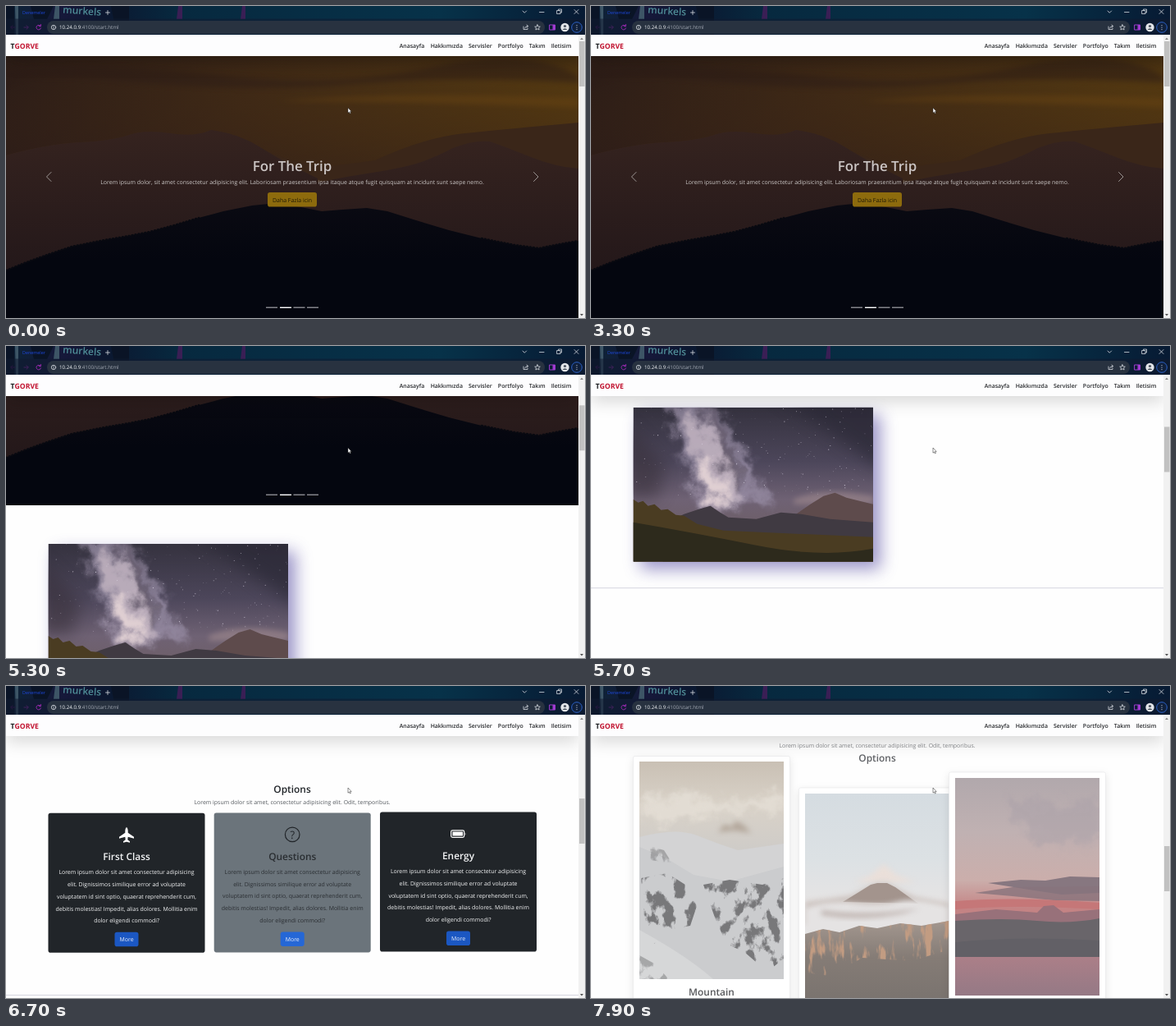
Recreate the animation shown at these times as an HTML page. Size 706x380 px, loop 8000 ms.

```html
<!DOCTYPE html>
<html lang="tr">
<head>
<meta charset="utf-8">
<title>Landing page scroll</title>
<style>
@property --s { syntax: '<number>'; inherits: true; initial-value: 0; }
html, body { margin: 0; width: 100%; height: 100%; overflow: hidden; background: #fff; }
#stage {
  display: block; width: 100vw; height: 100vh;
  font: 6.95px "Open Sans", "Noto Sans", sans-serif;
  text-rendering: geometricPrecision;
  animation: scroll 8s infinite;
}
.mid { text-anchor: middle; }
.h3 { font-size: 11.9px; font-weight: 600; }
#page { transform: translateY(calc(var(--s) * -1px)); }
#thumb { transform: translateY(calc(var(--s) * .1575px)); }
.line { fill: none; stroke-linecap: round; stroke-linejoin: round; }
.rise, .in { animation: rise 8s infinite; }
.in { animation-name: in; }
#bar { filter: drop-shadow(0 7px 10px rgba(0, 0, 0, .15)); }
.photo { filter: drop-shadow(0 3px 5px rgba(0, 0, 0, .1)); }
filter { color-interpolation-filters: sRGB; }

/* page offset, moving in tenths of a second */
@keyframes scroll {
  0% { --s: 0; animation-timing-function: step-end; }
  60% { --s: 20; animation-timing-function: steps(5); }
  66.25% { --s: 186; animation-timing-function: steps(9); }
  77.5% { --s: 560; animation-timing-function: steps(3); }
  81.25% { --s: 597; animation-timing-function: step-end; }
  87.5% { --s: 617; animation-timing-function: steps(8); }
  97.5% { --s: 958; animation-timing-function: step-end; }
  98.75%, 100% { --s: 965; }
}
@keyframes rise {
  0%, 77.5% { opacity: 0; transform: translateY(40px); animation-timing-function: steps(5); }
  83.75%, 100% { opacity: 1; transform: none; }
}
@keyframes in {
  0%, 91.25% { opacity: 0; transform: translate(var(--x, 0px), var(--y, 0px)); animation-timing-function: steps(6); }
  98.75%, 100% { opacity: 1; transform: none; }
}
</style>
</head>
<body>
<svg id="stage" viewBox="0 0 706 380" preserveAspectRatio="none">
  <defs>
    <linearGradient id="sky"><stop stop-color="#281b18"/><stop offset=".4" stop-color="#3c2816"/><stop offset="1" stop-color="#543a10"/></linearGradient>
    <linearGradient id="dusk" x2="0" y2="1"><stop stop-color="#140f12" stop-opacity=".65"/><stop offset=".3" stop-color="#4a2c14" stop-opacity=".15"/><stop offset="1" stop-color="#2a1a1a" stop-opacity=".6"/></linearGradient>
    <linearGradient id="far" x2="0" y2="1"><stop stop-color="#35231f"/><stop offset="1" stop-color="#1e1418"/></linearGradient>
    <linearGradient id="near" x2="0" y2="1"><stop stop-color="#0a0a12"/><stop offset=".5" stop-color="#04060f"/></linearGradient>
    <linearGradient id="night" x2="0" y2="1"><stop stop-color="#35323f"/><stop offset=".35" stop-color="#4c465a"/><stop offset=".6" stop-color="#6f6274"/><stop offset="1" stop-color="#6b5a58"/></linearGradient>
    <linearGradient id="snow" x2="0" y2="1"><stop stop-color="#c9c0b4"/><stop offset=".2" stop-color="#d9d2c8"/><stop offset=".4" stop-color="#cfccc8"/></linearGradient>
    <linearGradient id="pale" x2="0" y2="1"><stop stop-color="#d5dce1"/><stop offset=".3" stop-color="#dce1e4"/><stop offset=".5" stop-color="#e6e4e4"/></linearGradient>
    <linearGradient id="rock" x2="0" y2="1"><stop stop-color="#a3978f"/><stop offset=".4" stop-color="#857c76"/><stop offset="1" stop-color="#77716d"/></linearGradient>
    <linearGradient id="rose" x2="0" y2="1"><stop stop-color="#b1a8ac"/><stop offset=".25" stop-color="#c0b1b2"/><stop offset=".47" stop-color="#cbaeab"/><stop offset=".6" stop-color="#c48384"/></linearGradient>
    <linearGradient id="sea" x2="0" y2="1"><stop stop-color="#ab7f88"/><stop offset="1" stop-color="#957985"/></linearGradient>
    <linearGradient id="theme"><stop stop-color="#0d2437"/><stop offset=".1" stop-color="#16183a"/><stop offset=".17" stop-color="#0b1730"/><stop offset=".3" stop-color="#07293f"/><stop offset=".75" stop-color="#073249"/><stop offset="1" stop-color="#071a33"/></linearGradient>
    <filter id="soft" x="-30%" y="-30%" width="160%" height="160%"><feGaussianBlur stdDeviation="10"/></filter>
    <filter id="haze" x="-30%" y="-30%" width="160%" height="160%"><feGaussianBlur stdDeviation="3"/></filter>
    <filter id="wisp" x="-30%" y="-30%" width="160%" height="160%">
      <feTurbulence type="fractalNoise" baseFrequency=".045" numOctaves="4" seed="4" result="n"/>
      <feGaussianBlur in="SourceGraphic" stdDeviation="5"/>
      <feDisplacementMap in2="n" scale="36" xChannelSelector="R" yChannelSelector="G"/>
    </filter>
    <filter id="crag" x="0" y="0" width="1" height="1">
      <feTurbulence type="fractalNoise" baseFrequency=".07 .05" numOctaves="5" seed="9"/>
      <feColorMatrix values="0 0 0 0 .47  0 0 0 0 .47  0 0 0 0 .48  8 0 0 0 -4"/>
      <feComposite operator="in" in2="SourceAlpha"/>
    </filter>
    <filter id="glow" x="0" y="0" width="1" height="1">
      <feTurbulence type="fractalNoise" baseFrequency=".09 .025" numOctaves="4" seed="3"/>
      <feColorMatrix values="0 0 0 0 .76  0 0 0 0 .61  0 0 0 0 .51  7 0 0 0 -3.5"/>
      <feComposite operator="in" in2="SourceGraphic"/>
    </filter>
  </defs>
  <rect width="706" height="380" fill="#fefefe"/>

  <g id="page">
    <svg y="35" width="698" height="345" viewBox="0 35 698 345">
      <rect y="35" width="698" height="345" fill="url(#sky)"/>
      <rect y="35" width="698" height="200" fill="url(#dusk)"/>
      <g filter="url(#haze)" opacity=".45">
        <path d="M0 78Q120 68 260 84T520 74T698 86V94Q560 84 430 95T150 92T0 100Z" fill="#2a1b17"/>
        <path d="M330 116Q480 104 698 112V124Q520 116 330 116Z" fill="#6a4513"/>
      </g>
      <path d="M0 182Q50 168 90 166T150 157T200 155T250 151Q285 156 310 172T390 196L450 188Q510 160 560 155T698 142V380H0Z" fill="#3a2619"/>
      <path d="M0 182Q50 168 90 166T150 157T200 155T250 151Q285 156 310 172T380 210V380H0Z" fill="url(#far)"/>
      <path d="M340 224Q400 210 440 204T500 192T545 173Q570 163 590 165Q610 172 640 184T698 198V380H340Z" fill="url(#far)"/>
      <path d="M0 322L25 312 50 303 80 293 120 285 150 280 175 275 205 267 235 258 265 250 300 243 330 240 360 245 385 250 410 248 440 246 465 250 500 261 540 273 580 283 620 291 650 295 675 290 698 286V380H0Z" fill="url(#near)"/>
      <path d="M0 322L25 312 50 303 80 293 120 285 150 280 175 275 205 267 235 258M580 283L620 291 650 295 675 290 698 286" class="line" stroke="#080910" stroke-width="2.4" stroke-dasharray="1 3"/>
      <g class="mid">
        <text x="349" y="201" font-size="16.9" font-weight="600" fill="#cbc5c4">For The Trip</text>
        <text x="349" y="217" fill="#cac6c5">Lorem ipsum dolor, sit amet consectetur adipisicing elit. Laboriosam praesentium ipsa itaque atque fugit quisquam at incidunt sunt saepe nemo.</text>
        <rect x="319" y="227" width="60" height="17.5" rx="2.8" fill="#8d6b0d"/>
        <text x="349" y="238.6" fill="#1f1905">Daha Fazla icin</text>
      </g>
      <path d="M55 202.5L49.5 208 55 213.5M643.5 202.5L649 208 643.5 213.5" class="line" stroke="#aaa5a3" stroke-width=".9"/>
      <path d="M317 367.3H331M350.5 367.3H364.5M367 367.3H381" stroke="#83838a" stroke-width="1.4"/>
      <path d="M334 367.3H348" stroke="#fff" stroke-width="1.4"/>
    </svg>

    <rect x="60.5" y="436" width="292.5" height="188" fill="#4a3f9c" opacity=".55" filter="url(#soft)"/>
    <svg x="51.5" y="427" width="292.5" height="188">
      <rect width="293" height="188" fill="url(#night)"/>
      <path d="M170 -20H310V80Z" fill="#2b2937" opacity=".7" filter="url(#soft)"/>
      <path d="M-10 20L40 70 30 110H-10Z" fill="#38303a" opacity=".6" filter="url(#soft)"/>
      <g filter="url(#wisp)">
        <path d="M35 -10H88L130 45 168 120H80L62 60Z" fill="#9d92aa" opacity=".75"/>
        <path d="M55 10L82 8 112 60 138 112 92 116 74 60Z" fill="#cdbfc9" opacity=".7"/>
        <path d="M74 66L96 62 118 112H88Z" fill="#efdfdd" opacity=".7"/>
        <path d="M84 -5L90 -5 118 50 136 96 128 98 108 56Z" fill="#4b4250" opacity=".7"/>
      </g>
      <g id="stars" fill="#e6e0ee"/>
      <path d="M196 112Q230 96 293 108V118H196Z" fill="#a08a8e" opacity=".6" filter="url(#haze)"/>
      <path d="M190 136L216 118 232 108 246 104 260 110 276 114 293 118V188H190Z" fill="#5e4b4c"/>
      <path d="M36 142L62 130 80 124 94 120 106 128 116 134 150 136 180 128 205 130 240 136 293 140V188H36Z" fill="#403a42"/>
      <path d="M0 112L6 116 12 114 18 120 26 118 34 125 42 124 52 131 62 132 78 142 110 150 293 158V188H0Z" fill="#4a3c22"/>
      <path d="M0 140Q70 152 150 168T293 172V188H0Z" fill="#2d2a1c"/>
    </svg>

    <path d="M0 647H698M0 973.5H698" stroke="#d5d5df"/>
    <g class="mid rise">
      <text x="349" y="729.5" class="h3" fill="#212529" dy="-3">Options</text>
      <text x="349" y="741" fill="#555a5f">Lorem ipsum dolor sit amet, consectetur adipisicing elit. Odit, temporibus.</text>
    </g>
    <g id="cards" class="mid"/>

    <g class="mid in">
      <text x="349" y="1039.6" fill="#85878a">Lorem ipsum dolor sit amet, consectetur adipisicing elit. Odit, temporibus.</text>
      <text x="349" y="1056.5" class="h3" fill="#606266">Options</text>
    </g>

    <g class="in" style="--y:24px">
      <rect x="51.5" y="1050.5" width="191" height="330" rx="2" fill="#fff" stroke="#e6e6e8" stroke-width=".6" class="photo"/>
      <svg x="59" y="1057" width="176" height="265">
        <rect width="176" height="265" fill="url(#snow)"/>
        <path d="M0 50Q40 30 80 44T176 36V62Q110 56 70 68T0 66Z" fill="#e2dcd3" filter="url(#wisp)"/>
        <path d="M96 86L104 76 112 80 118 72 128 78 136 87 116 84Z" fill="#b3a79b" filter="url(#haze)"/>
        <path d="M0 92Q45 80 70 90T120 108L176 100V265H0Z" fill="#d3d3d4"/>
        <path d="M0 104L30 116 66 138 110 146 176 128V265H0Z" fill="#cbccce"/>
        <path d="M0 205Q60 238 90 265H0Z" fill="#d6d7d8"/>
        <path d="M2 142L34 136 56 150 70 176 62 200 40 204 18 222 6 190ZM78 150L110 144 150 150 176 142V240L156 256 128 232 106 222 92 190Z" filter="url(#crag)"/>
        <path d="M2 100L30 108 40 124 14 120ZM0 236L18 246 36 265H0Z" opacity=".5" filter="url(#crag)"/>
      </svg>
      <text x="147" y="1342" class="mid h3" fill="#58595c">Mountain</text>
    </g>

    <g class="in" style="--y:7px">
      <rect x="253.5" y="1089" width="191" height="330" rx="2" fill="#fff" stroke="#e6e6e8" stroke-width=".6" class="photo"/>
      <svg x="261" y="1096" width="176" height="265">
        <rect width="176" height="265" fill="url(#pale)"/>
        <path d="M80 100L96 86 112 100 135 108H60Z" fill="#eadfd9" filter="url(#haze)"/>
        <path d="M0 132L30 128 56 124 78 113 88 109 100 109 112 115 134 126 176 134V160H0Z" fill="#ccc3bf" filter="url(#haze)"/>
        <path d="M46 132L64 121 80 111 88 109 100 109 110 114 124 124 138 134Z" fill="#a3948d"/>
        <path d="M0 140Q28 130 60 134T112 132T176 138V172H0Z" fill="#e5e3e3" filter="url(#haze)"/>
        <path d="M20 142Q70 150 140 140L120 146Q70 156 20 148Z" fill="#bfb4b0" filter="url(#haze)"/>
        <path d="M0 171L22 165 42 169 66 161 88 164 116 158 142 161 176 155V265H0Z" fill="url(#rock)"/>
        <path d="M0 171L22 165 42 169 66 161 88 164 116 158 142 161 176 155V190L130 204 70 200 30 222 0 218Z" filter="url(#glow)"/>
      </svg>
    </g>

    <g class="in" style="--x:-24px;--y:24px">
      <rect x="436.5" y="1070" width="191" height="330" rx="2" fill="#fff" stroke="#e6e6e8" stroke-width=".6" class="photo"/>
      <svg x="444" y="1077" width="176" height="265">
        <rect width="176" height="265" fill="url(#rose)"/>
        <path d="M60 20Q110 40 176 26V80Q120 90 80 60Z" fill="#a9a0a8" opacity=".5" filter="url(#wisp)"/>
        <path d="M40 128L80 124 110 125 140 120 176 121V140L130 142 90 136Z" fill="#877780"/>
        <path d="M24 140L70 133 176 132V150L120 149 70 144Z" fill="#87737c" opacity=".8"/>
        <path d="M0 150Q70 144 176 152V160Q70 154 0 160Z" fill="#c57778"/>
        <path d="M0 166L50 160 100 164 108 156 120 155 132 164 176 160V180H0Z" fill="#98717a"/>
        <path d="M0 174Q60 170 100 174T176 171V218H0Z" fill="#69656a"/>
        <path d="M0 200Q80 192 176 198V219H0Z" fill="#626066"/>
        <rect y="218" width="176" height="47" fill="url(#sea)"/>
      </svg>
    </g>
  </g>

  <rect id="bar" y="35" width="698" height="26" fill="#fdfdfe"/>
  <text x="5.6" y="52" font-size="8.7" font-weight="700" fill="#15171a">T<tspan fill="#c1122f">GORVE</tspan></text>
  <g id="menu" class="mid" font-weight="600" fill="#26282b"/>

  <rect x="698" y="35" width="8" height="345" fill="#f1f1f1"/>
  <rect id="thumb" x="699" y="43" width="6.5" height="55" fill="#c1c1c1"/>
  <path d="M700 41L702 38.5 704 41Z" fill="#8a8a8a"/>
  <path d="M700 375L702 377.5 704 375Z" fill="#505050"/>

  <svg width="706" height="35">
    <rect width="706" height="35" fill="url(#theme)"/>
    <path d="M0 0H10V35H0ZM30 0H58L50 16H34ZM128 0H150V35H135Z" fill="#0a1426"/>
    <path d="M11 0H15V35H12ZM60 0H65V16H58Z" fill="#3d5566"/>
    <path d="M210 0H215V16H208ZM288 0H292V16H286Z" fill="#3a1f55"/>
    <text x="69" y="8.5" font-size="12" font-weight="600" fill="#4f8d97" transform="rotate(4 69 8)">murkels</text>
    <rect y="15.5" width="706" height="19.5" fill="#121a30" opacity=".55"/>
    <rect x="50" y="18" width="607" height="16" rx="8" fill="#283240"/>
    <text x="20" y="10.2" font-size="5.4" fill="#1d48dc">Denemeler</text>
    <g class="line" stroke="#d5d9df" stroke-width=".8">
      <path d="M121.5 8H126.5M124 5.5V10.5M630 6L632.3 8.3 634.6 6M650.5 7.5H656M672 5.5H676V9.5H672ZM673.5 5.5V4H677.5V8H676M693 4.5L698 9.5M698 4.5L693 9.5"/>
      <circle cx="58" cy="26" r="2.7"/><path d="M58 25.8V27.3M58 24.5V24.6"/>
      <path d="M631 25V28.5H636V27M632.5 27Q633 24.5 636.5 24.5M635 23L636.7 24.5 635 26"/>
      <path d="M648 22.8L649 25 651.3 25.2 649.6 26.7 650.1 29 648 27.8 645.9 29 646.4 26.7 644.7 25.2 647 25Z"/>
    </g>
    <g class="line">
      <path d="M11 26H6M8 23.7L5.7 26 8 28.3" stroke="#271741"/>
      <path d="M22 26H27M25 23.7L27.3 26 25 28.3" stroke="#41205c"/>
      <path d="M42 24.3A2.8 2.8 0 1 0 42.5 27M42.4 22.5V24.7H40.2" stroke="#9a2bb0"/>
      <rect x="663" y="23" width="6.5" height="6" stroke="#a03bd0"/>
    </g>
    <rect x="666.5" y="23" width="3" height="6" fill="#a03bd0"/>
    <circle cx="681.5" cy="26" r="5.2" fill="#e3e6ea"/>
    <circle cx="681.5" cy="24.5" r="1.6" fill="#4b5360"/>
    <path d="M678.5 29Q681.5 25.5 684.5 29Z" fill="#4b5360"/>
    <circle cx="696" cy="26" r="6.3" fill="#10203c" stroke="#2c62c8"/>
    <path d="M696 23.5V23.6M696 26V26.1M696 28.5V28.6" class="line" stroke="#d5d9df" stroke-width="1.2"/>
    <text x="65" y="28.3" font-size="6.2" fill="#f0f2f4">10.24.0.9<tspan fill="#a3a9b3">:4100/start.html</tspan></text>
  </svg>

  <path d="M417 124V130.2L418.4 129 419.4 131 420.4 130.5 419.5 128.6H421.2Z" fill="#fff" stroke="#222" stroke-width=".5"/>
</svg>

<script>
const add = (id, html) => document.getElementById(id).innerHTML += html;

let seed = 7;
const rnd = () => (seed = (seed * 16807) % 2147483647) / 2147483647;

const menu = [['Anasayfa', 495], ['Hakkımızda', 537.3], ['Servisler', 578.3],
  ['Portfolyo', 615.3], ['Takım', 647.8], ['Iletisim', 677]];
add('menu', menu.map(([word, x]) => `<text x="${x}" y="51.3">${word}</text>`).join(''));

const copy = ['Lorem ipsum dolor sit amet consectetur adipisicing',
  'elit. Dignissimos similique error ad voluptate',
  'voluptatem id sint optio, quaerat reprehenderit cum,',
  'debitis molestias! Impedit, alias dolores. Mollitia enim',
  'dolor eligendi commodi?'];

const plane = '<path fill="#fff" d="M0-9.5Q1.7-8 1.7-5V-2.5L9 2.5V4.5L1.7 2.5 1.3 6 4 8V9.5L0 8.5-4 9.5V8L-1.3 6-1.7 2.5-9 4.5V2.5L-1.7-2.5V-5Q-1.7-8 0-9.5Z"/>';
const ask = '<circle r="8.8" fill="none" stroke="#212529" stroke-width="1.2"/><text y="4.7" font-size="13" fill="#212529">?</text>';
const battery = '<rect x="-8.8" y="-4.3" width="16" height="8.6" rx="1.8" fill="none" stroke="#fff" stroke-width="1.2"/><path d="M-7-2.5H5.5V2.5H-7ZM8.2-1.7Q9.8 0 8.2 1.7Z" fill="#fff"/>';

function card(x, top, title, icon, fill, ink, blue, cls) {
  const lines = copy.map((s, i) => `<text y="${74.5 + i * 14.75}">${s}</text>`).join('');
  add('cards', `<g class="${cls}"><g transform="translate(${x} ${top})" fill="${ink}">
    <rect x="-95.5" width="191" height="170" rx="2.8" fill="${fill}"/>
    <g transform="translate(0 26.5)">${icon}</g>
    <text y="57.5" class="h3">${title}</text>${lines}
    <rect x="-14.5" y="145" width="29" height="17.5" rx="2.8" fill="${blue}"/>
    <text y="156.7" fill="#e9eefa">More</text></g></g>`);
}
card(147, 751.8, 'First Class', plane, '#212529', '#f4f5f6', '#1b57c2', 'rise');
card(349.2, 751.4, 'Questions', ask, '#6b747b', '#2a2e32', '#2567d6', '');
card(551.5, 750.6, 'Energy', battery, '#212529', '#f4f5f6', '#1b57c2', 'rise');

let dots = '';
for (let i = 0; i < 190; i++) {
  dots += `<circle cx="${rnd() * 292}" cy="${rnd() * 110}" r="${.2 + rnd() * .4}" opacity="${.25 + rnd() * .6}"/>`;
}
add('stars', dots);
</script>
</body>
</html>
```
